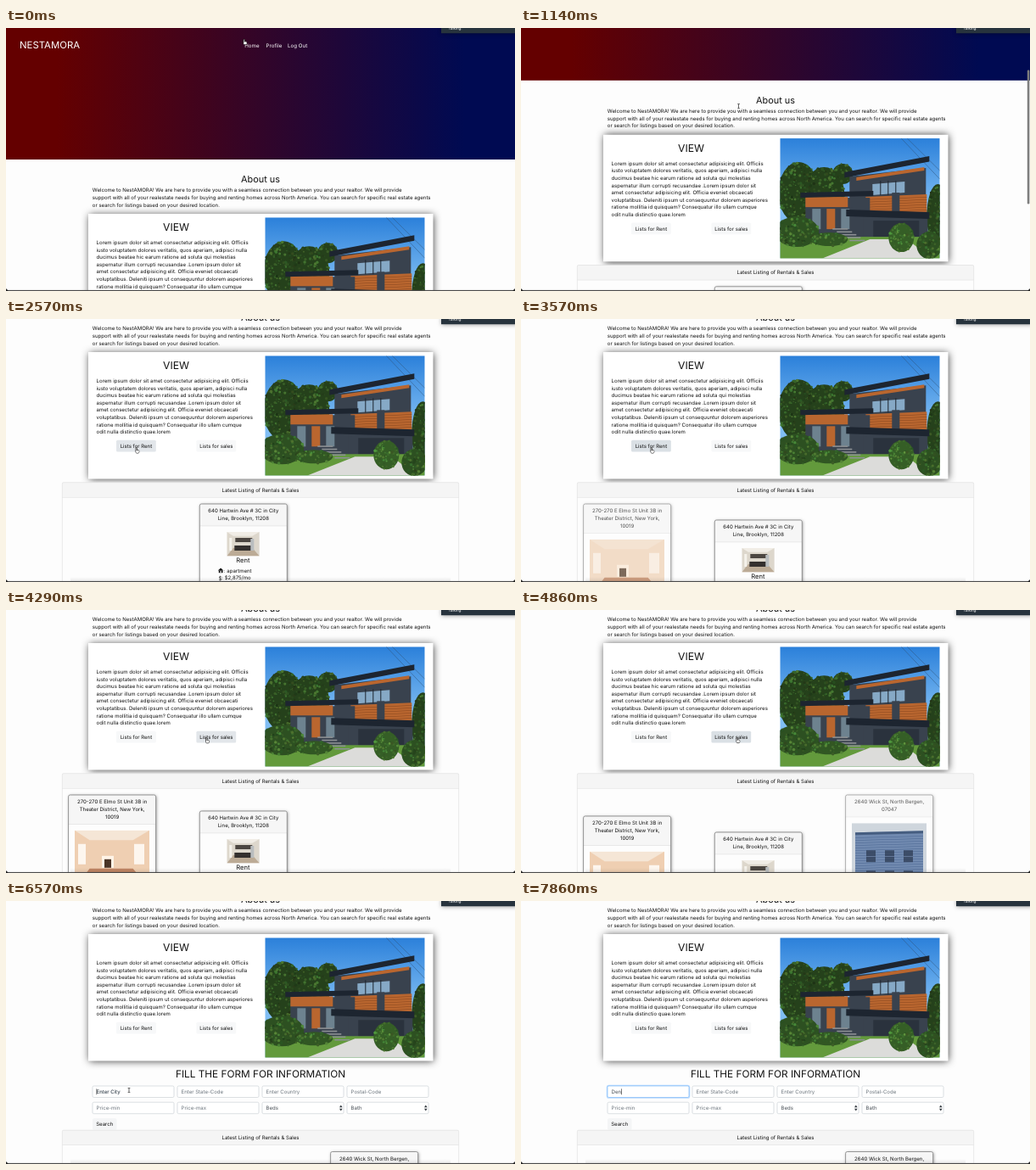
Write an HTML page with a canvas that moves like this. It is 600x310 px and loops after 8 s.

```html
<!DOCTYPE html>
<html lang="en">
<head>
<meta charset="utf-8">
<title>Home listings</title>
<style>
html, body { margin: 0; width: 600px; height: 310px; overflow: hidden; background: #fdfdfd; }
canvas { display: block; width: 600px; height: 310px; }
</style>
</head>
<body>
<canvas id="stage"></canvas>
<script>
const W = 600, H = 310, LOOP = 8000, TICK = 1000 / 7;
const canvas = document.getElementById('stage');
const ctx = canvas.getContext('2d');
const dpr = window.devicePixelRatio || 1;
canvas.width = W * dpr;
canvas.height = H * dpr;
ctx.textRendering = 'geometricPrecision';

const BODY = 6.05, LEAD = 8.6, PAPER = '#fdfdfd', INK = '#111';
const ABOUT = [
  'Welcome to NestAMORA! We are here to provide you with a seamless connection between you and your realtor. We will provide',
  'support with all of your realestate needs for buying and renting homes across North America. You can search for specific real estate agents',
  'or search for listings based on your desired location.'
];
const LOREM = [
  'Lorem ipsum dolor sit amet consectetur adipisicing elit. Officiis',
  'iusto voluptatem dolores veritatis, quos aperiam, adipisci nulla',
  'ducimus beatae hic earum ratione ad soluta qui molestias',
  'aspernatur illum corrupti recusandae .Lorem ipsum dolor sit',
  'amet consectetur adipisicing elit. Officia eveniet obcaecati',
  'voluptatibus. Deleniti ipsum ut consequuntur dolorem asperiores',
  'ratione mollitia id quisquam? Consequatur illo ullam cumque',
  'odit nulla distinctio quae.lorem'
];
const MOVES = [
  { at: 570, dur: 860, x: 248, y: 119 },
  { at: 2000, dur: 500, x: 154, y: 154.5 },
  { at: 3900, dur: 530, x: 255, y: 153 },
  { at: 5430, dur: 860, x: 145, y: 223 }
];

const clamp = v => Math.max(0, Math.min(1, v));
const progress = (t, at, dur) => clamp((t - at) / dur);
const ramp = (t, at, dur) => {
  const v = progress(t, at, dur);
  return v * v * (3 - 2 * v);
};

// a short nudge, then a long flick that slows down
const scrollAt = t => 22 * ramp(t, 430, 280) + 158 * (1 - (1 - progress(t, 860, 1140)) ** 2.1);

function pointerAt(t) {
  let x = 281, y = 16;
  for (const m of MOVES) {
    const k = ramp(t, m.at, m.dur);
    x += (m.x - x) * k;
    y += (m.y - y) * k;
  }
  return { x, y };
}

function rect(x, y, w, h, fill) {
  ctx.fillStyle = fill;
  ctx.fillRect(x, y, w, h);
}

function box(x, y, w, h, r, fill, line, width = 0.6) {
  ctx.beginPath();
  ctx.roundRect(x, y, w, h, r);
  if (fill) { ctx.fillStyle = fill; ctx.fill(); }
  if (line) { ctx.strokeStyle = line; ctx.lineWidth = width; ctx.stroke(); }
}

function poly(fill, ...p) {
  ctx.beginPath();
  for (let i = 0; i < p.length; i += 2) ctx.lineTo(p[i], p[i + 1]);
  ctx.closePath();
  ctx.fillStyle = fill;
  ctx.fill();
}

// upright sides, right end raised by rise
function slab(x, y, w, h, rise, fill) {
  poly(fill, x, y, x + w, y - rise, x + w, y - rise + h, x, y + h);
}

function vertical(y0, y1, a, b) {
  const g = ctx.createLinearGradient(0, y0, 0, y1);
  g.addColorStop(0, a);
  g.addColorStop(1, b);
  return g;
}

// y is the middle of the capitals
function text(str, x, y, size = BODY, align = 'left', color = INK) {
  ctx.font = `${size}px Inter, "Open Sans", sans-serif`;
  ctx.textAlign = align;
  ctx.fillStyle = color;
  ctx.fillText(str, x, y + size * 0.35);
}

function paragraph(lines, x, y, align) {
  lines.forEach((s, i) => text(s, x, y + i * LEAD, BODY, align));
}

function shadow(blur, color, offset, draw) {
  ctx.save();
  ctx.shadowBlur = blur * dpr;
  ctx.shadowColor = color;
  ctx.shadowOffsetX = ctx.shadowOffsetY = offset * dpr;
  draw();
  ctx.restore();
}

// run draw with its corner at x, y, clipped to w by h
function framed(x, y, w, h, draw) {
  ctx.save();
  ctx.translate(x, y);
  ctx.beginPath();
  ctx.rect(0, 0, w, h);
  ctx.clip();
  draw(w, h);
  ctx.restore();
}

let seed = 1;
const random = () => (seed = seed * 16807 % 2147483647) / 2147483647;

function bush(cx, cy, rx, ry, light = 24) {
  ctx.fillStyle = `hsl(104 42% ${light - 6}%)`;
  ctx.beginPath();
  ctx.ellipse(cx, cy, rx, ry, 0, 0, 7);
  ctx.fill();
  for (let i = 0; i < rx * ry / 4; i++) {
    const a = random() * 6.28, d = Math.sqrt(random());
    ctx.fillStyle = `hsl(${92 + random() * 20} 42% ${light - 10 + random() * 20}%)`;
    ctx.beginPath();
    ctx.arc(cx + Math.cos(a) * d * rx, cy + Math.sin(a) * d * ry, 0.6 + random() * 1.2, 0, 7);
    ctx.fill();
  }
}

function house(w, h) {
  const wall = '#39424e', dark = '#1d2530', wood = '#b9662f';
  seed = 7;
  rect(0, 0, w, h, vertical(0, 80, '#2b80da', '#7fbdf3'));
  ctx.strokeStyle = '#2f5378';
  ctx.lineWidth = 0.5;
  for (let i = 0; i < 2; i++) {
    ctx.beginPath();
    ctx.moveTo(143 + i * 7, 0);
    ctx.lineTo(w, 48 - i * 10);
    ctx.stroke();
  }
  bush(22, 64, 24, 36);
  bush(52, 66, 24, 32);
  bush(74, 42, 12, 12);
  bush(186, 92, 13, 38);
  // upper floor
  slab(82, 45, 90, 55, 10, wall);
  slab(90, 46, 80, 4, 12, wood);
  slab(76, 40, 100, 6.5, 19, dark);
  slab(109, 54, 38, 13, 3, '#86a9c6');
  for (let x = 118; x < 140; x += 9) rect(x, 50, 1, 17, dark);
  slab(101, 69, 72, 22, 3, wood);
  for (let y = 72; y < 90; y += 3) slab(101, y, 72, 0.5, 3, '#86451f');
  rect(132, 64, 9, 28, wall);
  // entry wing and garage
  rect(30, 70, 76, 50, wall);
  rect(30, 69, 50, 12, wood);
  for (let i = 0; i < 3; i++) rect(38 + i * 17, 83, 10, 24, i % 2 ? wood : '#6d828f');
  slab(24, 64, 86, 6, 2, dark);
  rect(98, 92, 76, 30, wall);
  slab(78, 84, 98, 8, -3, dark);
  rect(110, 97, 54, 25, '#2a323d');
  // garden and drive
  rect(0, 116, w, 26, '#639a3c');
  poly('#dcdcda', 50, h, 106, 119, 150, 119, 178, h);
  for (let i = 0; i < 5; i++) rect(62 + i * 5, 106 + i * 3.4, 18, 1.6, '#8c9093');
  bush(20, 110, 26, 18, 28);
  bush(58, 119, 22, 8, 30);
  bush(143, 117, 15, 17, 32);
  bush(176, 126, 15, 16, 28);
}

function room(w, h, ceiling, wall, floor) {
  rect(0, 0, w, h, wall);
  poly(ceiling, 0, 0, w, 0, w * 0.78, h * 0.17, w * 0.2, h * 0.17);
  poly(floor, 0, h, w * 0.2, h * 0.66, w * 0.78, h * 0.66, w, h);
}

function kitchen(w, h) {
  room(w, h, '#f1ede6', '#ddd7cc', '#bcab96');
  rect(10, 7, 20, 5, '#4c4641');
  rect(9, 16, 22, 6, '#34302e');
  rect(28, 8, 4, 14, '#b9bdbf');
  rect(3, 7, 3, 15, '#f5f2ec');
}

function livingRoom(w, h) {
  room(w, h, '#f5e6d6', '#efcfb2', '#c08563');
  rect(4, 16, 9, 24, '#fdf6ee');
  rect(70, 16, 12, 24, '#fdf6ee');
  rect(32, 30, 14, 14, '#fff4e7');
  rect(35, 34, 8, 10, '#4a3527');
}

function brickFront(w, h) {
  rect(0, 0, w, h, '#bcc6d0');
  slab(4, 11, 80, h, 2, '#4a6a9e');
  slab(4, 11, 80, 3, 2, '#33496c');
  for (let y = 17; y < h; y += 3) slab(4, y, 80, 0.5, 2, '#3a5684');
  for (let i = 0; i < 6; i++) {
    const x = 17 + (i % 3) * 22, y = 32 + Math.floor(i / 3) * 24;
    rect(x, y, 11, 14, '#29364c');
    rect(x, y + 7, 11, 0.8, '#8199bd');
  }
}

function homeIcon(x, y) {
  poly(INK, x, y, x + 3.3, y - 3, x + 6.6, y);
  rect(x + 1, y, 4.7, 2.7, INK);
  rect(x + 2.7, y + 0.6, 1.3, 2.1, '#fff');
}

function card(x, y, lines, height, alpha, content) {
  const w = 103, head = 8.5 + lines.length * LEAD;
  shadow(3.5, `rgba(0,0,0,${0.45 * alpha})`, 0.8, () => box(x, y, w, height, 2, PAPER));
  ctx.save();
  ctx.globalAlpha = alpha;
  rect(x, y, w, head, '#f6f6f6');
  rect(x, y + head, w, 0.5, '#d5d5d5');
  box(x, y, w, height, 2, null, '#707070', 0.7);
  paragraph(lines, x + w / 2, y + 8.3, 'center');
  content(x, y, head);
  ctx.restore();
}

function cards(t, top) {
  const rent = ramp(t, 3250, 500), sale = ramp(t, 4540, 500);
  const saleGap = sale > 0 ? 25 : 0, rentGap = rent > 0 ? 19 : 0;
  const photo = (h, draw) => (x, y, head) => framed(x + 7.4, y + head + 7.5, 88, h, draw);

  card(228.3, top + saleGap + rentGap, ['640 Hartwin Ave # 3C in City', 'Line, Brooklyn, 11208'], 130, 1, (x, y) => {
    framed(x + 32, y + 33, 38.5, 28.5, kitchen);
    text('Rent', x + 51, y + 66.5, 7.6, 'center');
    homeIcon(x + 21.5, y + 78.5);
    text(': apartment', x + 28.5, y + 78.5);
    text('$', x + 22.3, y + 87.3, 6.4);
    text(': $2,875/mo', x + 26, y + 87.3);
  });
  if (rent) card(73.6, top + saleGap, ['270-270 E Elmo St Unit 3B in', 'Theater District, New York,', '10019'], 149, rent, photo(68, livingRoom));
  if (sale) card(382.6, top, ['2640 Wick St, North Bergen,', '07047'], 174, sale, photo(75, brickFront));
}

function button(x, y, w, label, fill) {
  box(x, y, w, 13.8, 1.6, fill);
  text(label, x + w / 2, y + 6.9, BODY, 'center');
}

function field(i, label) {
  const x = 102 + (i % 4) * 100, y = 218 + Math.floor(i / 4) * 19.2, select = i > 5;
  box(x, y, 96, 13.5, 1.6, '#fff', '#c5cbd1');
  text(label, x + 4.6, y + 6.8, BODY, 'left', select ? '#495057' : '#6c757d');
  if (!select) return;
  for (const d of [-1, 1]) {
    const mid = y + 6.8 + d * 0.8;
    poly('#343a40', x + 91, mid, x + 92.8, mid + d * 2.6, x + 94.6, mid);
  }
}

function cityField(t) {
  const typed = 'Den'.slice(0, Math.max(0, Math.floor((t - 7565) / TICK) + 1));
  const ring = ramp(t, 6570, 290);
  if (ring) {
    ctx.globalAlpha = ring;
    box(102, 218, 96, 13.5, 1.6, null, '#bcdcff', 2.6);
    box(102, 218, 96, 13.5, 1.6, '#fff', '#6eb0f5');
    ctx.globalAlpha = 1;
    text(typed || 'Enter City', 106.6, 224.8, BODY, 'left', typed ? '#495057' : '#6c757d');
  }
  const lit = t > 6425 && (t > 7280 || t < 6990);
  if (lit) rect(106.6 + (typed ? ctx.measureText(typed).width : 0), 221.3, 0.6, 7, '#222');
}

function form(t, open) {
  ctx.save();
  ctx.beginPath();
  ctx.rect(60, 191, 480, 1 + 77.5 * open);
  ctx.clip();
  ctx.globalAlpha = open;
  text('FILL THE FORM FOR INFORMATION', 300, 203.7, 11.8, 'center');
  ['Enter City', 'Enter State-Code', 'Enter Country', 'Postal-Code', 'Price-min', 'Price-max', 'Beds', 'Bath']
    .forEach((s, i) => field(i, s));
  button(102, 256.3, 28.5, 'Search', '#f4f5f6');
  if (open === 1) cityField(t);
  ctx.restore();
}

function hero() {
  const g = ctx.createLinearGradient(0, 0, W, 0);
  g.addColorStop(0.1, '#640000');
  g.addColorStop(0.9, '#000a52');
  rect(0, 0, W, 155, g);
  text('NESTAMORA', 16, 20, 11.4, 'left', '#fff');
  ['Home', 'Profile', 'Log Out'].forEach((s, i) => text(s, 281.2 + i * 25.4, 21.2, 6.2, 'left', '#fff'));
}

function hand(x, y) {
  ctx.strokeStyle = INK;
  ctx.lineWidth = 0.7;
  box(x - 1, y, 3.8, 3.6, 1.2, '#fff', INK, 0.7);
  box(x - 1, y - 2.8, 1.4, 4.4, 0.7, '#fff', INK, 0.7);
  rect(x - 0.7, y + 0.6, 3.2, 2.4, '#fff');
}

function beam(x, y) {
  rect(x - 0.35, y - 2.5, 0.7, 5, '#222');
  for (const d of [-2.9, 2.3]) rect(x - 1.4, y + d, 2.8, 0.6, '#222');
}

function intro(t, mouse, scroll) {
  const choice = (x, label, click) => {
    const over = scroll > 170 && Math.abs(mouse.x - x - 23.4) < 23.4 && mouse.y > 142 && mouse.y < 158;
    button(x, 322.7, 46.8, label, !over ? '#f7f8f9' : t > click ? '#dae0e5' : '#e2e6ea');
  };
  text('About us', 300, 178.3, 10.9, 'center');
  paragraph(ABOUT, 101.8, 191.2);
  shadow(9, 'rgba(0,0,0,.8)', 0.6, () => rect(97, 219, 406.5, 149.5, '#fff'));
  text('VIEW', 200.5, 234.5, 12.2, 'center');
  paragraph(LOREM, 106.6, 252.8);
  choice(130, 'Lists for Rent', 3280);
  choice(224.4, 'Lists for sales', 4560);
  framed(305.3, 223.3, 188.4, 141.3, house);
}

function listing(t) {
  const open = ramp(t, 5250, 460);
  if (open) form(t, open);
  ctx.translate(0, 77.5 * open);
  rect(66.3, 192.7, 467.4, 17.5, '#f5f5f5');
  box(66.3, 192.7, 467.4, 320, 1.6, null, '#dcdcdc');
  rect(66.3, 210, 467.4, 0.5, '#dcdcdc');
  text('Latest Listing of Rentals & Sales', 300, 201.5, BODY, 'center');
  cards(t, 218);
}

function draw(time) {
  // the screen refreshes seven times a second
  const t = Math.floor((time + 5) / TICK) * TICK;
  const scroll = scrollAt(t), mouse = pointerAt(t);

  ctx.setTransform(dpr, 0, 0, dpr, 0, 0);
  rect(0, 0, W, H, PAPER);
  ctx.save();
  ctx.translate(0, -scroll);
  if (scroll < 155) hero();
  intro(t, mouse, scroll);
  ctx.translate(0, 180);
  listing(t);
  ctx.restore();

  if (scroll > 0) {
    ctx.globalAlpha = 1 - progress(t, 2140, 420);
    box(596.8, 2 + scroll * 0.51, 2.6, 158, 1.3, '#7d7d7d');
    ctx.globalAlpha = 1;
  }
  if (scroll > 140) rect(76, 304, 448, 5, vertical(304, 309, 'rgba(0,0,0,0)', 'rgba(0,0,0,.07)'));

  shadow(5, 'rgba(0,0,0,.4)', 0.5, () => rect(513, -2, 90, 8.2, '#27333d'));
  text('Talking:', 521.5, 0.2, 4.4, 'left', '#fff');
  rect(0, 308.9, W, 1.1, '#4a4a4a');
  poly('#222', 0, 307, 3, 310, 0, 310);
  poly('#222', W, 307, W - 3, 310, W, 310);

  if (t < 1000 || (t > 2280 && t < 5850)) hand(mouse.x, mouse.y);
  else if (t < 7280) beam(mouse.x, mouse.y);
}

const start = performance.now();
function loop() {
  draw((performance.now() - start) % LOOP);
  requestAnimationFrame(loop);
}
loop();
</script>
</body>
</html>
```
